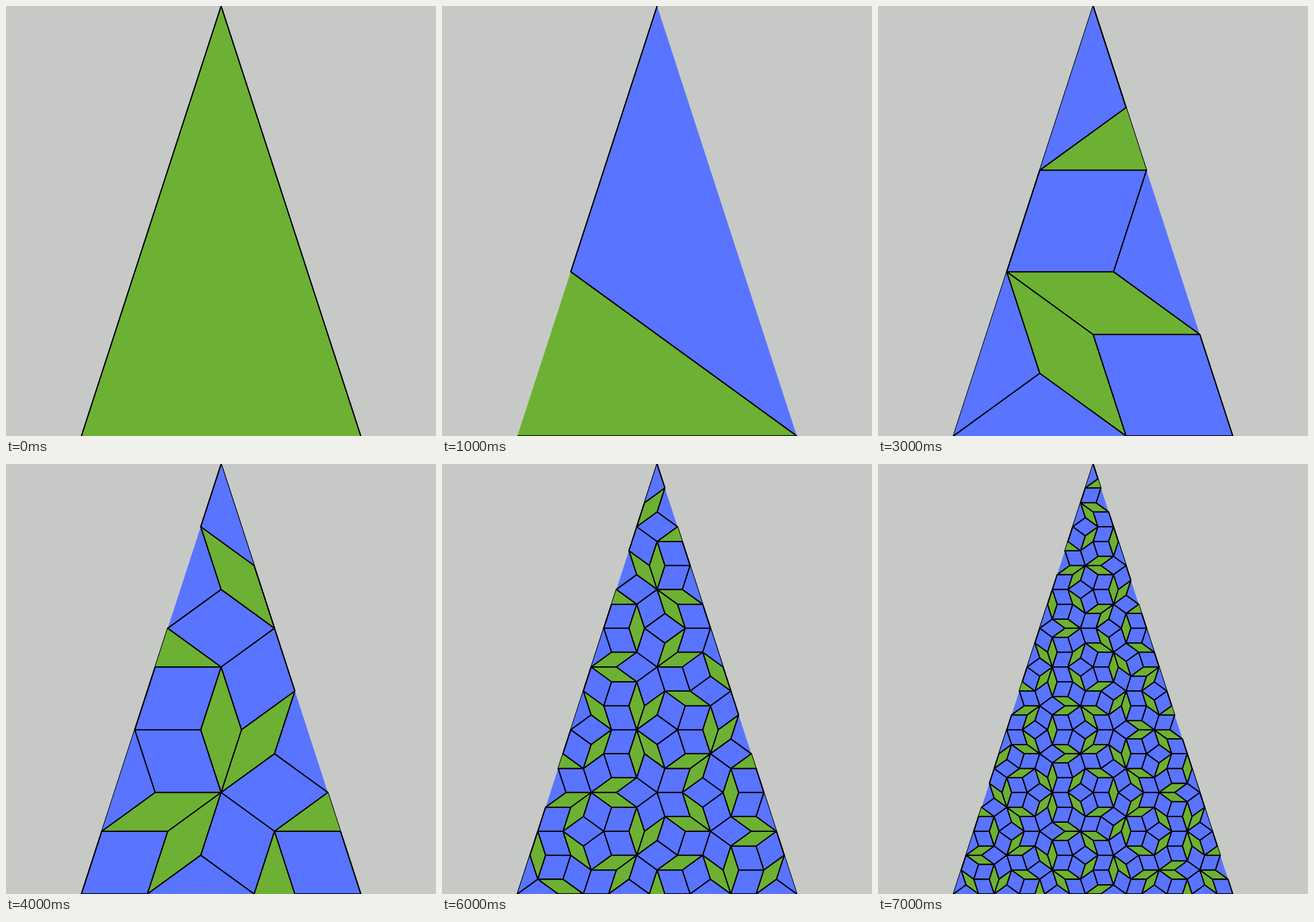
Write an HTML page with a canvas that moves like this. It is 748 px wide and 748 px high and loops after 9500 ms.

```html
<!DOCTYPE html>
<html lang="en">
<head>
<meta charset="utf-8">
<title>Penrose tiling by subdivision</title>
<style>
  html, body { margin: 0; width: 100%; height: 100%; overflow: hidden; background: #c7c9c6; }
  canvas { display: block; }
</style>
</head>
<body>
<canvas id="stage" width="748" height="748"></canvas>
<script>
const SIZE = 748, LOOP = 9500, STEP = 1000, LAST = 7;
const PHI = (1 + Math.sqrt(5)) / 2;
const BACK = '#c7c9c6', FILLS = ['#6cb134', '#5974ff'], LINE_WIDTH = 2.3;
const ctx = document.getElementById('stage').getContext('2d');

// The point that divides p..q in the golden ratio, nearer to q.
const golden = (p, q) => [p[0] + (q[0] - p[0]) / PHI, p[1] + (q[1] - p[1]) / PHI];

// Kind 0 is the acute triangle, kind 1 the obtuse one; a is the apex.
function split([kind, a, b, c]) {
  if (kind === 0) {
    const p = golden(a, b);
    return [[0, c, p, b], [1, p, c, a]];
  }
  const q = golden(b, a), r = golden(b, c);
  return [[1, r, c, a], [1, q, r, b], [0, r, q, a]];
}

const half = SIZE * Math.tan(Math.PI / 10), mid = SIZE / 2 + 0.2;
const levels = [[[0, [mid, 0], [mid - half, SIZE], [mid + half, SIZE]]]];
for (let i = 0; i < LAST; i++) levels.push(levels[i].flatMap(split));

function addPath(points) {
  points.forEach(([x, y], i) => i ? ctx.lineTo(x, y) : ctx.moveTo(x, y));
}

function strokeLegs(tiles) {
  ctx.beginPath();
  for (const [, a, b, c] of tiles) addPath([c, a, b]);
  ctx.stroke();
}

// One path per colour, all wound the same way, leaves no seams.
function fillKind(tiles, kind) {
  ctx.beginPath();
  for (const [k, a, b, c] of tiles) {
    if (k !== kind) continue;
    const turn = (b[0] - a[0]) * (c[1] - a[1]) - (b[1] - a[1]) * (c[0] - a[0]);
    addPath(turn > 0 ? [a, b, c] : [a, c, b]);
    ctx.closePath();
  }
  ctx.fillStyle = FILLS[kind];
  ctx.fill();
}

function draw(n) {
  ctx.fillStyle = BACK;
  ctx.fillRect(0, 0, SIZE, SIZE);
  ctx.strokeStyle = '#000';
  ctx.lineWidth = LINE_WIDTH;
  ctx.lineJoin = 'round';
  // Outlines of the two preceding levels still show along the rim.
  for (let i = Math.max(1, n - 2); i < n; i++) strokeLegs(levels[i]);
  fillKind(levels[n], 0);
  fillKind(levels[n], 1);
  strokeLegs(levels[n]);
}

let shown = -1;
const start = performance.now();
function frame() {
  const t = (performance.now() - start) % LOOP;
  const n = Math.min(LAST, Math.floor(t / STEP));
  if (n !== shown) draw(shown = n);
  requestAnimationFrame(frame);
}
frame();
</script>
</body>
</html>
```
